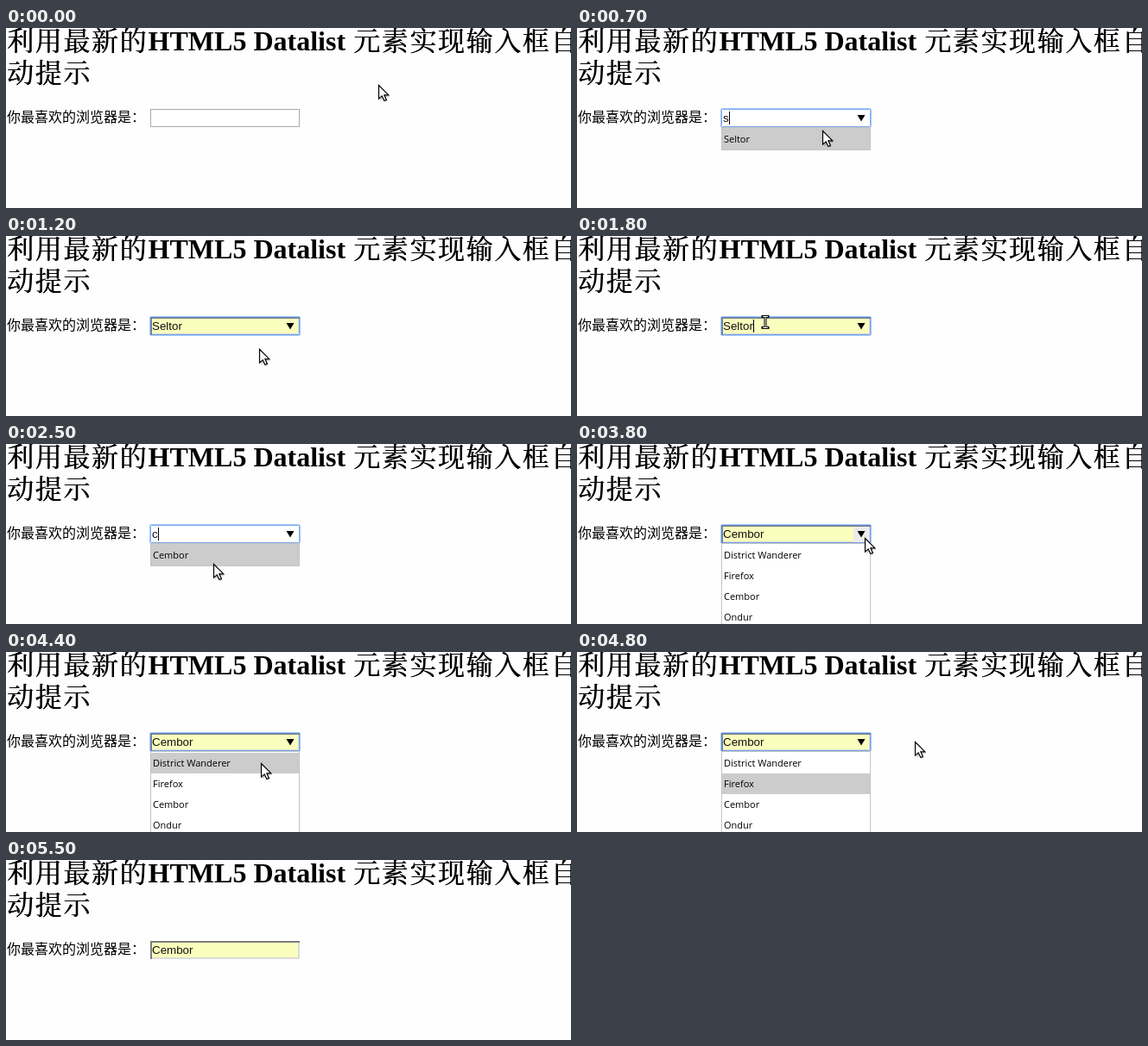
Animation of 654x209 px, one loop 5.6 s. Source, as an HTML page:

```html
<!DOCTYPE html>
<html lang="zh-CN">
<head>
<meta charset="utf-8">
<title>Datalist</title>
<style>
html, body { margin: 0; width: 100%; height: 100%; overflow: hidden; background: #fefefe; }
svg { display: block; }
text { white-space: pre; }
.han { font: 31px "Noto Serif CJK SC", "Noto Sans CJK SC", "Noto Sans CJK", sans-serif; letter-spacing: 1.6px; }
.latin { font: bold 32px "Liberation Serif", serif; }
.label { font: 16px "Noto Sans CJK SC", "Noto Sans CJK", sans-serif; }
#value { font: 13.33px "Liberation Sans", sans-serif; }
#list text { font: 11px "Open Sans", "Noto Sans", sans-serif; }
.line { fill: none; stroke-width: 1; }
</style>
</head>
<body>
<svg width="654" height="209" viewBox="0 0 654 209">
  <g id="han" class="han">
    <text x="1" y="26">利用最新的</text>
    <text x="402" y="26">元素实现输入框自</text>
    <text x="1" y="63">动提示</text>
  </g>
  <use href="#han" x=".5"/>
  <text class="latin" x="164.6" y="26">HTML5 Datalist</text>
  <text class="label" x="1" y="109">你最喜欢的浏览器是：</text>

  <rect id="field" x="167" y="94" width="173" height="21"/>
  <rect id="plain" class="line" x="167.5" y="94.5" width="172" height="20" stroke="#a9a9a9"/>
  <g id="inset" fill="none" stroke-width="2">
    <path d="M339 95V114H167" stroke="#dcdcdc"/>
    <path d="M168 115V95H340" stroke="#7d7d7d"/>
  </g>
  <g id="ring" class="line">
    <rect x="166.5" y="93.5" width="174" height="22" rx="1.5" stroke="#4d90fe" stroke-opacity=".5"/>
    <rect x="167.5" y="94.5" width="172" height="20" rx="1" stroke="#5b94e6" stroke-opacity=".8"/>
  </g>
  <rect id="button" x="320" y="96" width="18" height="18" fill="#ececec"/>
  <path id="arrow" d="M324.5 101H333.5L329 108.5Z"/>
  <rect id="selection" x="169" y="97" height="15" fill="#3390ff"/>
  <text id="value" x="169" y="109"></text>
  <rect id="caret" y="97" width="1" height="15"/>
  <g id="list"></g>

  <g id="pointer">
    <path d="M2 3V18.5L5.5 15.5L8.5 20L10.5 19L8.5 14H13Z" opacity=".2"/>
    <path d="M.5 .5V16.2L4.2 12.9L6.8 18.5L9.4 17.4L6.9 11.9H11.8Z" fill="#fff" stroke="#000" stroke-width="1.2"/>
  </g>
  <g id="beam" fill="none">
    <path id="stem" d="M-3 -6.5H3M0 -6.5V6.5M-3 6.5H3" stroke="#000" stroke-width="3" stroke-linecap="square"/>
    <path d="M-3 -6.5H3M0 -6.5V6.5M-3 6.5H3" stroke="#fff"/>
  </g>
</svg>
<script>
const LOOP = 5600, STEP = 100;
const browsers = ["District Wanderer", "Firefox", "Cembor", "Ondur", "Seltor"];
const $ = id => document.getElementById(id);

// Pointer hops: start time, then one "x,y" per step; "I" marks the text beam.
const hops = [
  [0, "431,66 348,85 278,93 I268,103 I250,103 I250,103 I256,107 284,119 290,126"],
  [1000, "292,128"],
  [1200, "293,131 294,133"],
  [1500, "288,130 264,117 I232,102 I218,100 I150,100 I105,100"],
  [2200, "I140,103 I180,106 194,139 240,139 248,135 255,131"],
  [2800, "257,130 262,128 274,124 290,119 303,115 312,112"],
  [3400, "325,110 333,109"],
  [3900, "330,114 324,122 317,143 310,160"],
  [4300, "302,145 295,129 296,143 303,147 340,128 391,104"],
  [4900, "456,97 508,77 555,65 603,50 651,36 700,30"]
];
const pointerSteps = hops.flatMap(([start, path]) =>
  path.split(" ").map((spot, i) => [start + i * STEP, spot]));

// Each entry changes only the named parts of the form.
const formSteps = [
  [0, { value: "", items: [], hover: -1, focus: false, filled: false, caret: false, selected: false, button: false }],
  [500, { focus: true, caret: true }],
  [700, { value: "s", items: ["Seltor"], hover: 0 }],
  [1200, { value: "Seltor", items: [], filled: true, caret: false }],
  [1800, { caret: true }],
  [1900, { selected: true, caret: false }],
  [2300, { value: "c", items: ["Cembor"], hover: -1, filled: false, selected: false, caret: true }],
  [2400, { hover: 0 }],
  [2900, { value: "Cembor", items: [], hover: -1, filled: true, caret: false }],
  [3500, { button: true }],
  [3700, { items: browsers }],
  [3900, { button: false, hover: 0 }],
  [4100, { hover: 1 }],
  [4400, { hover: 0 }],
  [4500, { hover: 1 }],
  [5500, { items: [], focus: false }]
];

const show = (id, on) => $(id).setAttribute("visibility", on ? "visible" : "hidden");
const reached = (steps, t) => steps.filter(([start]) => start <= t);

function listMarkup(items, hover) {
  if (!items.length) return "";
  const height = 2 + items.length * 24;
  const fill = items.length === 1 && hover === 0 ? "#ccc" : "#fff";
  const rows = items.map((name, i) => {
    const y = 117 + i * 24;
    const bar = i === hover ? `<rect x="168" y="${y}" width="171" height="24" fill="#ccc"/>` : "";
    return `${bar}<text x="170" y="${y + 16}">${name}</text>`;
  });
  return `<rect x="167.5" y="115.5" width="172" height="${height}" fill="${fill}" stroke="#c4c4c4"/>` + rows.join("");
}

function drawForm(form) {
  $("field").setAttribute("fill", form.filled ? "#faffbd" : "#fff");
  show("plain", !form.filled && !form.focus);
  show("inset", form.filled);
  show("ring", form.focus);
  show("arrow", form.focus);
  show("button", form.button);
  show("caret", form.caret);
  show("selection", form.selected);
  $("value").textContent = form.value;
  $("value").setAttribute("fill", form.selected ? "#fff" : "#111");
  const width = form.value ? $("value").getComputedTextLength() : 0;
  $("caret").setAttribute("x", Math.round(169 + width));
  $("selection").setAttribute("width", width);
  $("list").innerHTML = listMarkup(form.items, form.hover);
}

function drawPointer(spot) {
  const beam = spot[0] === "I";
  show("beam", beam);
  show("pointer", !beam);
  $(beam ? "beam" : "pointer").setAttribute("transform", `translate(${spot.replace("I", "")})`);
}

let drawn = -1;
function frame(now) {
  const t = Math.floor((now % LOOP) / STEP) * STEP;
  if (t !== drawn) {
    drawn = t;
    drawForm(Object.assign({}, ...reached(formSteps, t).map(step => step[1])));
    drawPointer(reached(pointerSteps, t).pop()[1]);
  }
  requestAnimationFrame(frame);
}
frame(0);
</script>
</body>
</html>
```
